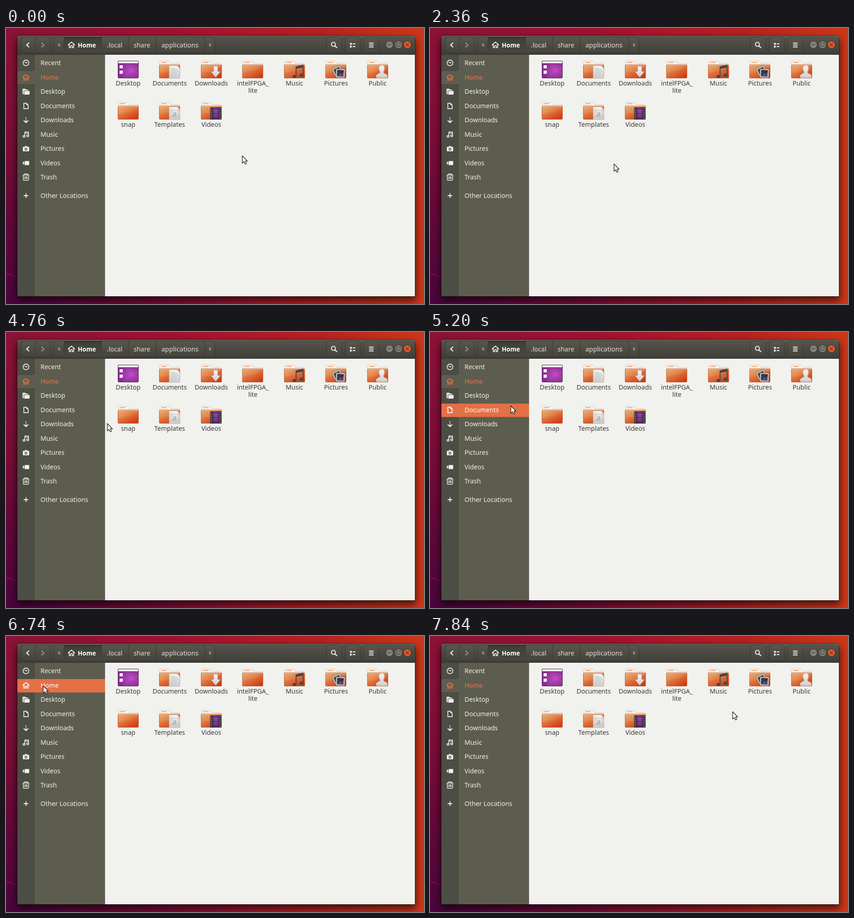
An HTML page that plays this animation: 920 px wide and 609 px high, repeating every 8 s.

```html
<!DOCTYPE html>
<html lang="en">
<head>
<meta charset="utf-8">
<title>File manager</title>
<style>
html, body { margin: 0; width: 100%; height: 100%; overflow: hidden; background: #8e1238; }
svg { display: block; width: 100%; height: 100%; }
text { font: 14px "Noto Sans", "Open Sans", sans-serif; }
.place { color: #f0f0ea; }
.home { color: #ea7148; }
.place.hot { color: #fff; }
.place text { fill: currentColor; }
.glyph { fill: none; stroke: currentColor; stroke-width: 1.7; }
.glyph .solid { fill: currentColor; stroke: none; }
.bar text { fill: #e2dfd7; }
.file text { fill: #3a3a3a; text-anchor: middle; }
</style>
</head>
<body>
<svg id="stage" viewBox="0 0 920 609" preserveAspectRatio="none">
  <defs>
    <linearGradient id="wall">
      <stop offset="0" stop-color="#8c1137"/><stop offset=".4" stop-color="#a01232"/>
      <stop offset=".75" stop-color="#b42222"/><stop offset="1" stop-color="#cb3819"/>
    </linearGradient>
    <radialGradient id="dusk" gradientUnits="userSpaceOnUse" cx="0" cy="640" r="700">
      <stop offset="0" stop-color="#47043f"/><stop offset=".35" stop-color="#5c0739" stop-opacity=".8"/>
      <stop offset="1" stop-color="#8c1137" stop-opacity="0"/>
    </radialGradient>
    <linearGradient id="title" x2="0" y2="1">
      <stop offset="0" stop-color="#57554c"/><stop offset="1" stop-color="#3e3d37"/>
    </linearGradient>
    <linearGradient id="button" x2="0" y2="1">
      <stop offset="0" stop-color="#57554d"/><stop offset="1" stop-color="#45443d"/>
    </linearGradient>
    <linearGradient id="pressed" x2="0" y2="1">
      <stop offset="0" stop-color="#3b3a34"/><stop offset=".25" stop-color="#43423b"/>
      <stop offset="1" stop-color="#474640"/>
    </linearGradient>
    <linearGradient id="front" x2=".75" y2="1">
      <stop offset="0" stop-color="#e6ac68"/><stop offset=".45" stop-color="#e07a3f"/>
      <stop offset="1" stop-color="#cd3c16"/>
    </linearGradient>
    <linearGradient id="back" x2="0" y2="1">
      <stop offset="0" stop-color="#fbfaf7"/><stop offset="1" stop-color="#d9d4cb"/>
    </linearGradient>
    <linearGradient id="paper" x2="0" y2="1">
      <stop offset="0" stop-color="#f5f5f5"/><stop offset="1" stop-color="#cfcfcf"/>
    </linearGradient>
    <radialGradient id="purple" cx=".62" cy=".55" r=".75">
      <stop offset="0" stop-color="#bd4bc2"/><stop offset="1" stop-color="#7a2484"/>
    </radialGradient>
    <radialGradient id="film" cx=".5" cy=".4" r=".7">
      <stop offset="0" stop-color="#8f4f9c"/><stop offset="1" stop-color="#4c2560"/>
    </radialGradient>
    <filter id="shade" x="-10%" y="-10%" width="120%" height="125%"><feGaussianBlur stdDeviation="8"/></filter>
    <g id="folder">
      <path d="M1.5 36V3Q1.5 1 3.500 1H20Q22 1 23 3L25 6H43Q44.500 6 44.500 8V36Z" fill="url(#back)" stroke="#c4bbb0" stroke-width=".8"/>
      <path d="M5 4H17" stroke="#ee9f6d" stroke-width="1.8"/>
      <rect x=".5" y="9" width="45" height="29.500" rx="1.5" fill="url(#front)" stroke="#b9461e" stroke-width=".8"/>
      <path d="M1.500 10H44.500" stroke="#f3c08e" stroke-width="1"/>
      <path d="M1 27Q24 25 45 13V10H1Z" fill="#fff" opacity=".07"/>
    </g>
    <path id="house" d="M-7.500 0L0 -6.500L7.500 0M-4.700 -1.500V5.800H-1.700V1.500H1.700V5.800H4.700V-1.500"/>
  </defs>
  <rect width="920" height="609" fill="url(#wall)"/>
  <rect width="920" height="609" fill="url(#dusk)"/>
  <path d="M0 542L26 549" stroke="#8a0c55" stroke-width="4" opacity=".45"/>
  <rect x="22" y="24" width="881" height="578" rx="6" opacity=".6" filter="url(#shade)"/>
  <path d="M24.500 592.500V24Q24.500 16.500 32 16.500H893Q900.500 16.500 900.500 24V592.500Z" stroke="#000" stroke-opacity=".4" fill="none"/>
  <path d="M25 592V24Q25 17 32 17H893Q900 17 900 24V592Z" fill="#f1f1ee"/>
  <path d="M25 59V24Q25 17 32 17H893Q900 17 900 24V59Z" fill="url(#title)"/>
  <path d="M31 17.500H894" stroke="#706e64"/>
  <path d="M25 58.500H900" stroke="#34332e"/>
  <rect x="25" y="59" width="193" height="533" fill="#5d5d4f"/>
  <rect x="25" y="59" width="38" height="533" fill="#4c4d44"/>
  <path d="M62.500 59V592" stroke="#45463d"/>
  <g id="bar" class="bar"></g>
  <g id="places"></g>
  <g id="files"></g>
  <path id="pointer" d="M1 1V17.300L4.800 13.800L7.300 19.300L10 18.100L7.600 12.700H12.300Z" fill="#fff" stroke="#1c1c1c" stroke-width="1.25" stroke-linejoin="round"/>
</svg>
<script>
const byId = id => document.getElementById(id);
const at = (x, y, body) => `<g transform="translate(${x} ${y})">${body}</g>`;
const label = (x, y, str, extra = '') => `<text x="${x}" y="${y}" ${extra}>${str}</text>`;
const solid = d => `<path class="solid" d="${d}"/>`;

function headerBar() {
  const box = (x, w) => `<rect x="${x + .5}" y="20.500" width="${w}" height="34" rx="4" fill="url(#button)" stroke="#35342f"/>
    <path d="M${x + 4} 21.500h${w - 7}" stroke="#68665c"/>`;
  const split = x => `<path d="M${x}.500 21V54" stroke="#38372f"/>`;
  const icon = (x, body, color = '#f2f0ea') => at(x, 37.500, `<g class="glyph" color="${color}">${body}</g>`);
  const control = (x, fill, d) => `<circle cx="${x}" cy="37" r="8" fill="${fill}" stroke="#34332e" stroke-width=".8"/>
    <path transform="translate(${x} 37)" d="${d}" fill="none" stroke="#3d3b36" stroke-width="1.2"/>`;
  return box(33, 63) + split(64) + box(105, 354)
    + '<rect x="127" y="21" width="83" height="33.500" fill="url(#pressed)"/><path d="M127 21.500H210" stroke="#2e2d28"/>'
    + [127, 210, 269, 329, 437].map(split).join('')
    + [706, 747, 788].map(x => box(x - 1, 33)).join('')
    + icon(48, '<path d="M3 -5L-2.500 0L3 5" stroke-width="2.200"/>')
    + icon(81, '<path d="M-3 -5L2.500 0L-3 5" stroke-width="2"/>', '#99968c')
    + icon(116, solid('M2.500 -4.500V4.500L-2.500 0Z'), '#99968c')
    + icon(450, solid('M-2.500 -4.500V4.500L2.500 0Z'), '#99968c')
    + icon(144, '<use href="#house"/>')
    + icon(722, '<circle cx="-1.500" cy="-1.500" r="4.400" stroke-width="2"/><path d="M1.800 1.800L6.500 6.500" stroke-width="2.400"/>')
    + icon(763, solid('M-6 -4.500h4v4h-4zM-6 1.500h4v4h-4zM0 -3.500h6v2h-6zM0 2.500h6v2h-6z'))
    + icon(804, '<path d="M-5 -4.300H5M-5 0H5M-5 4.300H5" stroke-width="2"/>')
    + label(158, 43, 'Home', 'style="font-weight:700;font-size:13.500px;fill:#fff"')
    + label(222, 43, '.local') + label(281, 43, 'share')
    + label(342, 43, 'applications', 'style="font-size:14.400px"')
    + control(844, '#85827a', 'M-4 0H4') + control(864, '#85827a', 'M-3.500 -3.500H3.500V3.500H-3.500Z')
    + control(883.5, '#eb552c', 'M-3 -3L3 3M3 -3L-3 3');
}

const places = [
  ['Recent', '<circle r="6.300"/><path d="M-2.800 -2.500L0 .500L3 -2" stroke-width="1.500"/>'],
  ['Home', '<use href="#house"/>'],
  ['Desktop', solid('M-7.500 -6h6l1.500 2h5v2h-10v8h-2.500zM-4 -1h12v8h-12z')],
  ['Documents', '<path d="M-4.700 -6.200H1L4.700 -2.500V6.200H-4.700Z"/>' + solid('M.500 -6.500V-2H5Z')],
  ['Downloads', '<path d="M-5 1L0 5.800L5 1M0 -6.500v2M0 -3v2M0 .500V5" stroke-width="2"/>'],
  ['Music', '<path d="M-2.500 4V-5.500H5.500V3M-2.500 -3H5.500"/><circle cx="-4.300" cy="4" r="2"/><circle cx="3.700" cy="3" r="2"/>'],
  ['Pictures', solid('M-7 -3.500h3.500l1.500 -2h4l1.500 2h3.500v9.500h-14z') + '<circle cy="1.200" r="3" fill="#4c4d44" stroke="none"/><circle cy="1.200" r="1.500" class="solid"/>'],
  ['Videos', solid('M-3 -4.500h10v9h-10zM-7 -4L-3 0L-7 4Z')],
  ['Trash', '<path d="M-7 -4.500H7M-3.500 -5V-7H3.500V-5M-5.700 -4V5Q-5.700 6.800 -4 6.800H4Q5.700 6.800 5.700 5V-4M-2.500 -1.500V4M0 -1.500V4M2.500 -1.500V4" stroke-width="1.500"/>'],
  ['Other Locations', '<path d="M-5 0H5M0 -5V5" stroke-width="2"/>'],
];

function sidebar() {
  return places.map(([name, icon], i) => {
    const y = i === 9 ? 370 : 77.3 + i * 31.5;
    const top = Math.round(y - 14.3);
    const rest = name === 'Home' ? `<rect x="25" y="${top}" width="38" height="29" fill="#5d5d4f"/>` : '';
    return `<g class="place ${name.toLowerCase()}">${rest}
      <rect class="cell" x="25" y="${top}" width="38" height="29.500" fill="#e47046" opacity="0"/>
      <rect class="row" x="63" y="${top}" width="155" height="29.500" fill="#e47046" opacity="0"/>
      ${at(44, Math.round(y), `<g class="glyph">${icon}</g>`)}
      ${label(76, Math.round(y) + 5, name)}</g>`;
  }).join('');
}

const page = '<path d="M22 11H40L45.500 17V39H22Z" fill="url(#paper)" stroke="#a9a5a0" stroke-width=".8"/>';
const photo = (x, y, angle, fill) => `<g transform="translate(${x} ${y}) rotate(${angle})">
  <rect x="-9.500" y="-9.500" width="19" height="19" fill="#f4f4f4" stroke="#55504c" stroke-width=".8"/>
  <rect x="-7.500" y="-7.500" width="15" height="15" fill="${fill}"/></g>`;
const emblems = {
  Documents: page + '<path d="M25 17H36M25 20.500H42M25 24H42M25 27.500H39M25 31H42M25 34.500H37" stroke="#b4b4b4" stroke-width="1.200"/>',
  Downloads: '<path d="M28 12H37V24H43L32.500 37L22 24H28Z" fill="url(#paper)" stroke="#a39d98" stroke-width=".9"/>',
  Music: '<path d="M26.500 35V13.500L42 10V32" fill="none" stroke="#4a4543" stroke-width="2"/><path d="M26 13L43 9.500V15L26 18.500Z" fill="#4a4543"/><ellipse cx="23" cy="35" rx="4.300" ry="3.200" fill="#4a4543"/><ellipse cx="38.500" cy="32" rx="4.300" ry="3.200" fill="#4a4543"/>',
  Pictures: photo(27, 23, -28, '#574f4b') + photo(33, 28, 3, '#393447') + '<path d="M26 35L32 27L36 31L40 25V35Z" fill="#5a5268"/>',
  Public: '<path d="M20 38V34Q20 30 26 28.500L28 27V24Q25 20 26 15Q28 10 32 10Q37 10 38 15Q39 20 36 24V27L38 28.500Q44.500 30 44.500 34V38Z" fill="url(#paper)" stroke="#b5afaa" stroke-width=".8"/>',
  Templates: page + '<path d="M27 13V37M42 15V37M22 33H45M23 19H45M22 23L38 39" stroke="#b8b8b8" fill="none"/><text x="34" y="32" style="font-size:17px;fill:#999">a</text>',
  Videos: '<rect x="20.500" y="12" width="24" height="27" fill="#2d292c"/><rect x="25" y="13" width="15" height="25" fill="url(#film)"/><path d="M25 25.500H40" stroke="#2d292c" stroke-width="1"/><path d="M22.700 14V38M42.300 14V38" stroke="#bdb8bd" stroke-width="1.600" stroke-dasharray="2 2.200"/>',
};
const desktopIcon = `<rect x=".5" y=".500" width="45" height="38" rx="2" fill="url(#purple)" stroke="#59335e"/>
  <path d="M1 6.500V3Q1 1 3 1H43Q45 1 45 3V6.500Z" fill="#eeeae6"/><path d="M1 6.500H45" stroke="#4d3150"/>
  <path d="M4 10h7v7h-7zM4 22h7v7h-7z" fill="#f5eff5"/>
  <path d="M14 38Q26 20 45 16M20 8Q34 18 45 32" fill="none" stroke="#d574d5" opacity=".3"/>`;
const files = ['Desktop', 'Documents', 'Downloads', 'intelFPGA_ lite', 'Music', 'Pictures', 'Public', 'snap', 'Templates', 'Videos'];

function fileGrid() {
  return files.map((name, i) => {
    const x = 268.8 + (i % 7) * 91.5, y = i < 7 ? 72 : 163;
    const art = name === 'Desktop' ? desktopIcon : '<use href="#folder"/>' + (emblems[name] || '');
    return `<g class="file">${at(Math.round(x - 23), y, art)}
      ${name.split(' ').map((line, n) => label(x, y + 54.5 + n * 16.5, line)).join('')}</g>`;
  }).join('');
}

byId('bar').innerHTML = headerBar();
byId('places').innerHTML = sidebar();
byId('files').innerHTML = fileGrid();

// start ms, pointer x, pointer y, hovered place, opacity of its icon cell
const steps = [
  [0, 519, 281], [440, 501, 276], [860, 451, 268], [1140, 392, 254], [1420, 363, 240],
  [1800, 361, 251], [2080, 365, 298], [2360, 404, 299], [2780, 419, 293], [3340, 417, 293],
  [3620, 388, 298], [3900, 367, 294], [4180, 332, 284], [4460, 301, 265], [4760, 222, 201],
  [5020, 198, 180, 3], [5140, 177, 162, 3], [5260, 161, 147, 2], [5360, 150, 136, 2],
  [5480, 140, 126, 1], [5720, 81, 115, 1], [6000, 158, 110, 1], [6280, 79, 108, 1],
  [6600, 100, 249, 5], [6740, 81, 109, 1], [7160, 81, 109, 2, .5],
  [7280, 110, 190, 4], [7400, 190, 249, 5], [7540, 330, 238], [7680, 505, 205], [7840, 665, 166],
];
const rows = [...document.querySelectorAll('.place')];
const pointer = byId('pointer');

function draw() {
  const time = performance.now() % 8000;
  const [, x, y, hover = -1, cell = 1] = steps.findLast(step => step[0] <= time);
  pointer.setAttribute('transform', `translate(${x} ${y})`);
  rows.forEach((row, i) => {
    const hot = i === hover;
    row.classList.toggle('hot', hot);
    row.querySelector('.cell').setAttribute('opacity', hot ? cell : 0);
    row.querySelector('.row').setAttribute('opacity', hot ? 1 : 0);
  });
  requestAnimationFrame(draw);
}
draw();
</script>
</body>
</html>
```
